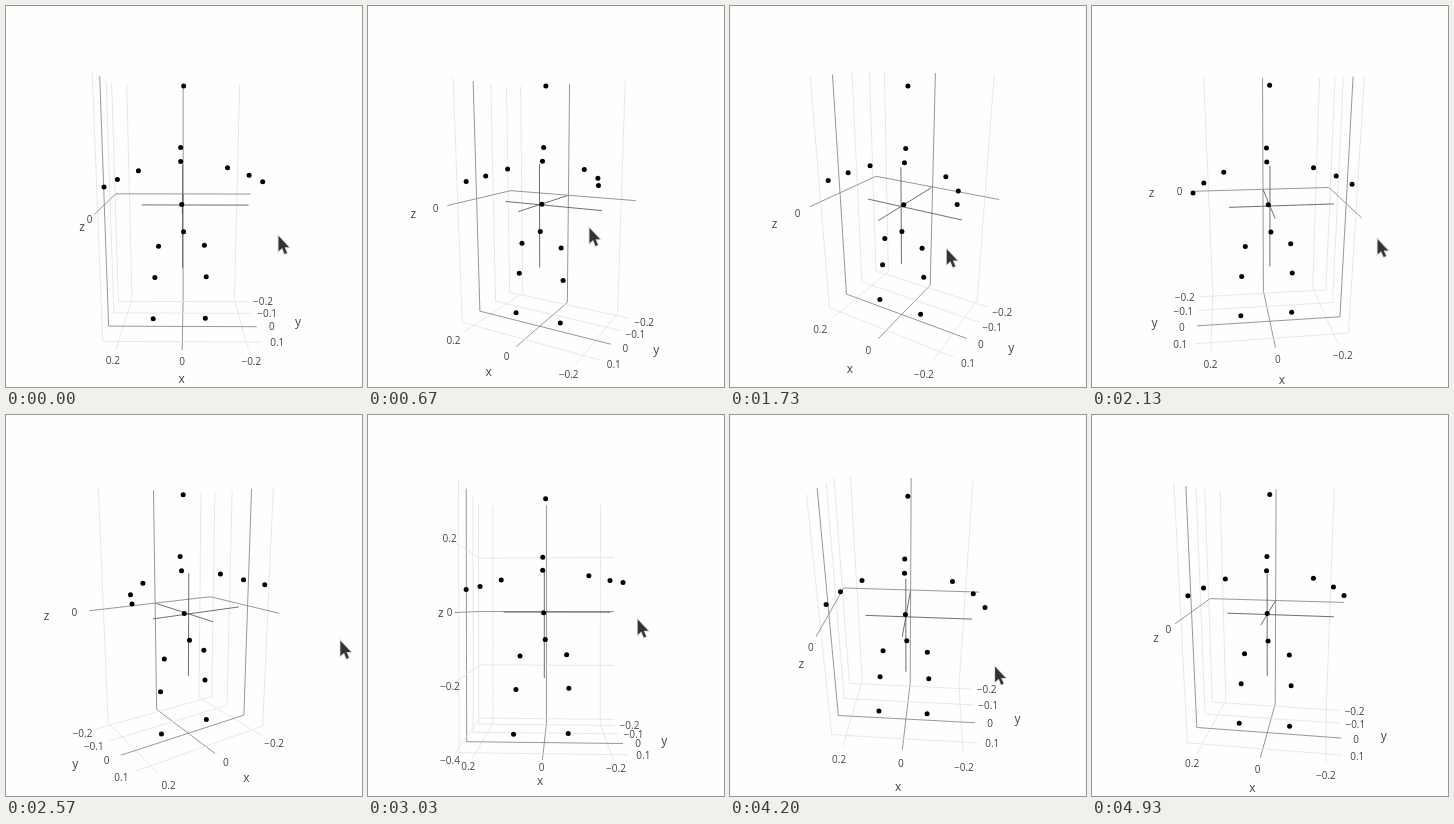
Recreate the animation shown at these times as an HTML page with a canvas. Size 356x381 px, loop 5410 ms.

```html
<!DOCTYPE html>
<html>
<head>
<meta charset="utf-8">
<style>
html, body { margin: 0; width: 100%; height: 100%; overflow: hidden; background: #fefefe; }
canvas { display: block; }
</style>
</head>
<body>
<canvas id="stage" width="356" height="381"></canvas>
<script>
const ctx = document.getElementById('stage').getContext('2d');
const LOOP = 5410, FOCAL = 408, DISTANCE = 1.335, CX = 176.7, CY = 197;
const X = [-.25, .25], Y = [-.22, .15], Z = [-.417, .395];
const MID_Y = -.035;
const GRID = '#e4e4e4', ZERO = '#868686', CROSS = '#555';

// turns of the plot: time, azimuth, elevation in degrees
const turns = [
  [0, -.5, 10.5], [400, -.5, 10.5], [670, -28, 10], [1370, -52, 24.5],
  [2130, 6.5, 16], [2650, 34, 11], [3030, -2, .5], [3220, -3, .5],
  [4000, -4.5, 26], [4200, -4.5, 26], [4700, -9, 16],
  [4930, -8, 13.5], [LOOP, -8, 13.5]
];

// [x, y, z]: head to hips, then the left limbs, mirrored for the right
const spine = [
  [-.003, -.037, .37], [.0065, -.04, .18], [.0065, -.032, .136],
  [.003, -.021, -.002], [-.003, .001, -.0875]
];
const limbs = [
  [.143, -.029, .111], [.205, .015, .09], [.234, .085, .078],
  [.0755, -.017, -.14], [.086, -.019, -.249], [.088, -.005, -.391]
];
// the body is turned and leans a little to one side
const pose = ([x, y, z]) => [x + .03 * Math.max(0, -z), y - .05 * x, z - .04 * x];
const joints = [
  ...spine,
  ...limbs.flatMap(([x, y, z]) => [pose([x, y, z]), pose([-x, y, z])])
];

const slope = (i, c) => {
  const a = turns[i], b = turns[i + 1];
  return a && b ? (b[c] - a[c]) / (b[0] - a[0]) : 0;
};
const tangent = (i, c) => {
  const p = slope(i - 1, c), q = slope(i, c);
  return p * q > 0 ? 2 * p * q / (p + q) : 0;
};
// monotone cubic through the turns
function valueAt(t, c) {
  const i = turns.findIndex(k => k[0] > t) - 1;
  const a = turns[i], b = turns[i + 1], h = b[0] - a[0], u = (t - a[0]) / h;
  return a[c] + (b[c] - a[c]) * u * u * (3 - 2 * u)
    + h * u * (1 - u) * ((1 - u) * tangent(i, c) - u * tangent(i + 1, c));
}

function camera(azimuth, elevation) {
  const a = azimuth * Math.PI / 180, e = elevation * Math.PI / 180;
  const sa = Math.sin(a), ca = Math.cos(a), se = Math.sin(e), ce = Math.cos(e);
  return (x, y, z) => {
    y -= MID_Y;
    const near = x * sa + y * ca;
    const k = FOCAL / (DISTANCE - near * ce - z * se);
    return [CX + (y * sa - x * ca) * k, CY - (z * ce - near * se) * k];
  };
}

function line(a, b, color) {
  ctx.strokeStyle = color;
  ctx.beginPath();
  ctx.moveTo(...a);
  ctx.lineTo(...b);
  ctx.stroke();
}

// text placed beyond b on the line from a to b
function label(a, b, text, size, reach, drop) {
  const dx = b[0] - a[0], dy = b[1] - a[1], len = Math.hypot(dx, dy);
  const k = Math.min(1, len / 80) / len;
  ctx.font = size + 'px "Open Sans", sans-serif';
  ctx.fillText(text, b[0] + dx * k * reach, b[1] + dy * k * drop + 1);
}
const tick = (a, b, v) => label(a, b, String(v).replace('-', '\u2212'), 10, 15, 17);
const title = (a, b, text) => label(a, b, text, 12, 43, 45);

function drawAxes(P, azimuth, elevation) {
  const [back, front] = Y, [floor, top] = Z;
  const wall = azimuth > 0 ? X[0] : X[1], open = -wall;
  const shade = v => v ? GRID : ZERO;
  const xEnds = x => [P(x, back, floor), P(x, front, floor)];
  const yEnds = y => [P(wall, y, floor), P(open, y, floor)];
  const zBack = z => [P(wall, back, z), P(open, back, z)];
  const zSide = z => [P(wall, back, z), P(wall, front, z)];
  const zEnds = azimuth > 0 ? zBack : zSide;
  const xTicks = [.2, -.2, 0], yTicks = [-.2, -.1, .1, 0];
  const zTicks = elevation < 5 ? [.2, -.2, -.4, 0] : [0];

  ctx.lineWidth = .85;
  for (const x of xTicks) {
    line(P(x, back, floor), P(x, back, top), shade(x));
    line(...xEnds(x), shade(x));
  }
  for (const y of yTicks) {
    line(P(wall, y, floor), P(wall, y, top), shade(y));
    line(...yEnds(y), shade(y));
  }
  for (const z of zTicks) {
    line(...zBack(z), shade(z));
    line(...zSide(z), shade(z));
  }
  for (const axis of [0, 1, 2]) {
    const ends = [.13, -.21].map(v => P(...[0, 1, 2].map(i => i === axis ? v : 0)));
    line(...ends, CROSS);
  }

  ctx.fillStyle = '#444';
  xTicks.forEach(x => tick(...xEnds(x), x));
  yTicks.forEach(y => tick(...yEnds(y), y));
  zTicks.forEach(z => tick(...zEnds(z), z));
  title(...xEnds(0), 'x');
  title(...yEnds(MID_Y), 'y');
  title(...zEnds(0), 'z');
}

// the pointer drags the plot, so it follows from the angles
function drawPointer(t, azimuth, elevation) {
  const approach = 7 * Math.min(1, Math.max(0, (200 - t) / 100));
  const arrow = new Path2D('M0 0V16.5L4 13L6.6 19.5L9.2 18.4L6.6 12.2H11.5Z');
  ctx.save();
  ctx.translate(272.5 + (azimuth + .5) / .54, 223 + (elevation - 10.5) / .54 + approach);
  ctx.scale(.92, .92);
  ctx.strokeStyle = '#ddd';
  ctx.lineWidth = 2;
  ctx.stroke(arrow);
  ctx.fillStyle = '#333';
  ctx.fill(arrow);
  ctx.restore();
}

function draw(t) {
  const azimuth = valueAt(t, 1), elevation = valueAt(t, 2);
  const P = camera(azimuth, elevation);
  ctx.fillStyle = '#fefefe';
  ctx.fillRect(0, 0, 356, 381);
  ctx.textAlign = 'center';
  ctx.textBaseline = 'middle';
  drawAxes(P, azimuth, elevation);
  ctx.fillStyle = '#000';
  for (const joint of joints) {
    ctx.beginPath();
    ctx.arc(...P(...joint), 2.5, 0, 7);
    ctx.fill();
  }
  if (t < 4925) drawPointer(t, azimuth, elevation);
}

function frame() {
  draw(performance.now() % LOOP);
  requestAnimationFrame(frame);
}
frame();
</script>
</body>
</html>
```
